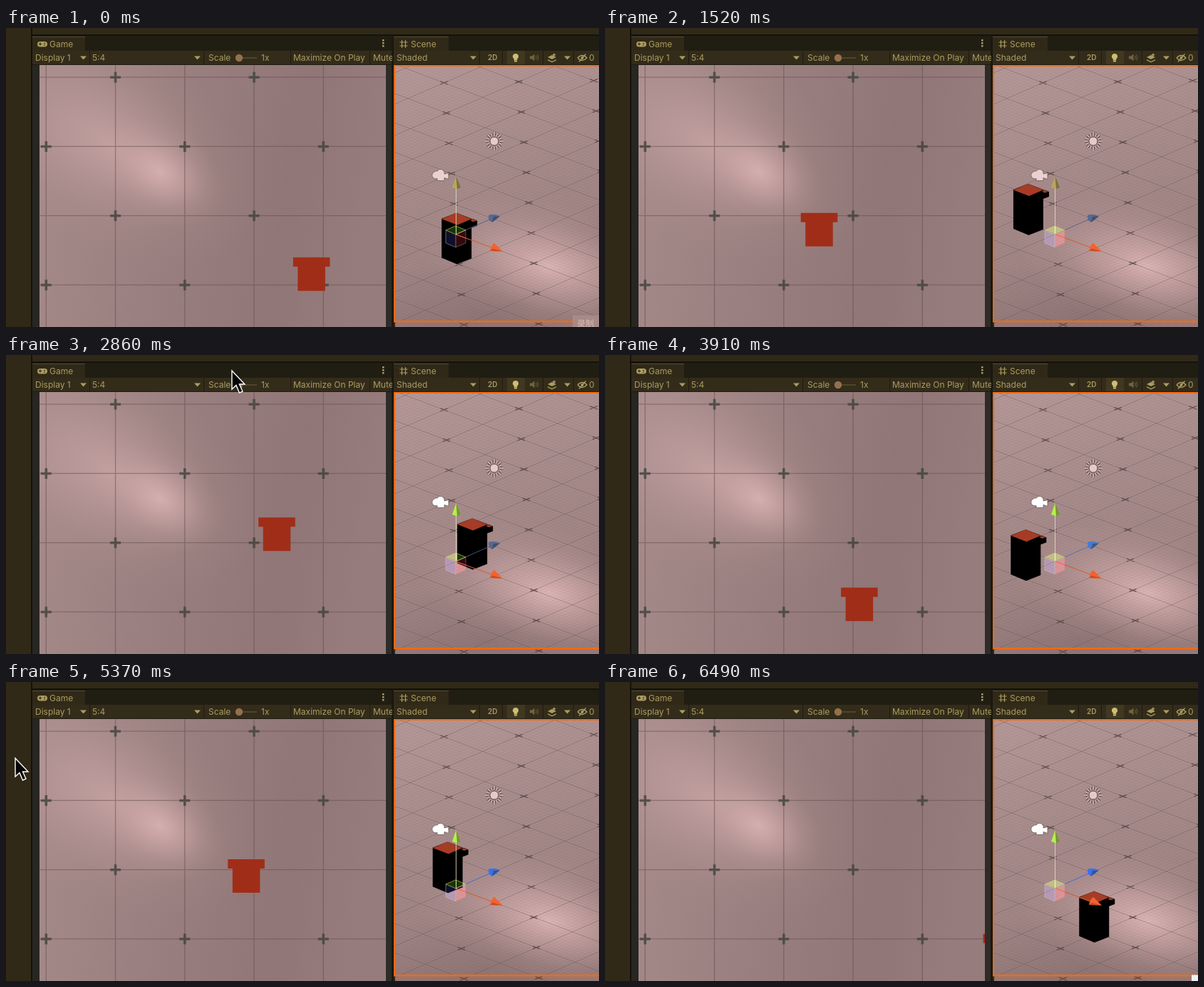
Write an HTML page that moves like this. It is 832x420 px and loops after 6.56 s.

```html
<!DOCTYPE html>
<html lang="en">
<head>
<meta charset="utf-8">
<title>Game and scene views</title>
<style>
  html, body { margin: 0; width: 832px; height: 420px; overflow: hidden; background: #312917; }
  svg { display: block; }
  text { font: 12px Inter, Roboto, sans-serif; fill: #aa9c62; }
  .cube { mix-blend-mode: plus-lighter; }
  .glyph { fill: #aa9c62; }
  .line { fill: none; stroke: #aa9c62; }
</style>
</head>
<body>
<svg width="832" height="420" viewBox="0 0 832 420">
  <defs>
    <clipPath id="gameClip"><path d="M47 52H533V420H47Z"/></clipPath>
    <clipPath id="sceneClip"><path d="M546 54H832V420H546Z"/></clipPath>
    <linearGradient id="gameBase" x2="1" y2=".12">
      <stop offset="0" stop-color="#a78b8b"/>
      <stop offset=".5" stop-color="#977d7d"/>
      <stop offset=".78" stop-color="#907676"/>
      <stop offset="1" stop-color="#967c7c"/>
    </linearGradient>
    <linearGradient id="sceneBase" x2=".25" y2="1">
      <stop offset="0" stop-color="#b59897"/>
      <stop offset=".45" stop-color="#a88c8c"/>
      <stop offset=".75" stop-color="#a18585"/>
      <stop offset="1" stop-color="#907676"/>
    </linearGradient>
    <radialGradient id="glow">
      <stop offset="0" stop-color="#e4bbbb" stop-opacity=".9"/>
      <stop offset=".35" stop-color="#dcb3b3" stop-opacity=".55"/>
      <stop offset=".7" stop-color="#cfa8a8" stop-opacity=".16"/>
      <stop offset="1" stop-color="#c8a0a0" stop-opacity="0"/>
    </radialGradient>
    <linearGradient id="gutter">
      <stop offset="0" stop-color="#272622"/>
      <stop offset="1" stop-color="#2e2c28"/>
    </linearGradient>
  </defs>

  <!-- window chrome -->
  <path fill="#312917" d="M0 0H832V420H0Z"/>
  <path fill="#201d13" d="M37 10H832V32H37Z"/>
  <path fill="#312917" d="M37 12H111V32H37ZM544 12H621V32H544Z"/>
  <path fill="#14120b" d="M35 0H37V420H35ZM37 9H832V11H37Z"/>
  <path fill="#504a3a" d="M37 12H111V13H37ZM544 12H621V13H544Z"/>
  <path fill="#332c1a" d="M37 32H832V52H37Z"/>
  <path fill="#1f1b10" d="M37 51H832V52H37ZM117 32h1V52h-1ZM277 32h1V52h-1ZM399 32h1V52h-1ZM510 32h1V52h-1ZM664 32h1V52h-1ZM696 32h1V52h-1ZM753 32h1V52h-1ZM796 32h1V52h-1Z"/>
  <path fill="url(#gutter)" d="M37 52H47V420H37ZM533 52H544V420H533Z"/>
  <path fill="#1a1810" d="M541 10H544V420H541Z"/>

  <text x="61" y="27">Game</text>
  <text x="568" y="27">Scene</text>
  <text x="41" y="46">Display 1</text>
  <text x="121" y="46">5:4</text>
  <text x="284" y="46">Scale</text>
  <text x="358" y="46">1x</text>
  <text x="403" y="46">Maximize On Play</text>
  <svg x="511" y="32" width="31" height="20"><text x="4" y="14">Mute</text></svg>
  <text x="548" y="46">Shaded</text>
  <text x="676" y="45" style="font-size:10px;font-weight:600">2D</text>
  <text x="818" y="46">0</text>

  <path class="glyph" d="M104 39.500h9l-4.500 5ZM264 39.500h9l-4.500 5ZM651 39.500h9l-4.500 5ZM783 39.500h9l-4.500 5ZM528 16h2.500v2.500H528ZM528 20h2.500v2.500H528ZM528 24h2.500v2.500H528Z"/>
  <path class="line" stroke-opacity=".45" d="M322 42H352"/>
  <circle cx="327" cy="42" r="5.200" fill="#94704c"/>
  <rect class="glyph" x="44" y="19" width="14" height="7.500" rx="3.700"/>
  <path stroke="#312917" stroke-width="1.200" d="M46 22.500h4M48 20.500v4M53 21.500h2M53 24h2"/>
  <path class="line" stroke-width="1.200" d="M555.500 17v11M560.500 17v11M552.500 20h11M552.500 25h11"/>
  <path fill="#40381f" d="M703 32H728V51H703Z"/>
  <path fill="#d0bd74" d="M715 36a4 4 0 0 1 2.300 7.300v2.200h-4.600v-2.200a4 4 0 0 1 2.300-7.300ZM713 46h4v1.500h-4Z"/>
  <g opacity=".5">
    <path class="glyph" d="M735 39.500h3l3.500-3v10l-3.500-3h-3Z"/>
    <path class="line" d="M743.500 39q1.500 2.500 0 5M745.500 37.500q3 4 0 8"/>
  </g>
  <path class="glyph" d="M760 41l6-3 6 3-6 3ZM760 44l6 3 6-3v1.500l-6 3-6-3ZM769 35l1 2 2 .5-2 1-1 2-1-2-2-1 2-.5Z"/>
  <path class="line" stroke-width="1.300" d="M802 42q6.500-7 13 0q-6.500 7-13 0M804 47.500l9.500-11"/>
  <circle class="glyph" cx="808.500" cy="42" r="2"/>

  <!-- game view -->
  <g clip-path="url(#gameClip)">
    <path fill="url(#gameBase)" d="M47 52H533V420H47Z"/>
    <ellipse rx="230" ry="140" transform="translate(148 165) rotate(30)" fill="url(#glow)" opacity=".55"/>
    <ellipse rx="100" ry="66" transform="translate(216 202) rotate(32)" fill="url(#glow)" opacity=".8"/>
    <path id="gameGrid" stroke="#67504f" stroke-opacity=".55" stroke-width="1.300"/>
    <path id="pluses" stroke="#3c4038" stroke-opacity=".72" stroke-width="3.600"/>
    <path id="player" fill="#a02d18" d="M0 0H51.500V13H45V47H6.500V13H0Z"/>
  </g>

  <!-- scene view -->
  <g clip-path="url(#sceneClip)">
    <path fill="url(#sceneBase)" d="M544 52H832V420H544Z"/>
    <ellipse rx="190" ry="92" transform="translate(762 335) rotate(14)" fill="url(#glow)"/>
    <path id="minor" stroke="#5c4a4a" stroke-opacity=".06"/>
    <path id="major" stroke="#5c5050" stroke-opacity=".38"/>
    <path id="marks" stroke="#4c403c" stroke-opacity=".65" stroke-width="1.500"/>
    <g id="figure">
      <path d="M0 8L21 0L42 8V64L21.500 72L0 63ZM35 11L44 8.500L50 11V18L42 21L36 19Z"/>
      <path fill="#a63c25" d="M0 8.500L21 0L42 8.500L22 17ZM40 10.500L44 9L49 11L44 12.500Z"/>
    </g>
    <path class="rays" stroke="#594847" stroke-width="3.200"/>
    <path class="rays" stroke="#e6cac8" stroke-width="1.500"/>
    <circle cx="685" cy="159" r="6" fill="#e6cac8" stroke="#594847"/>
    <path id="camera" stroke="#6a5856" stroke-width=".8" d="M601 202a4.500 4.500 0 0 1 4-1a5.500 5.500 0 0 1 10 1.500l0 2.500l6-1.500v9l-6-2v4h-10v-3a4.500 4.500 0 1 1-4-9.500Z"/>
    <g fill="none">
      <path stroke="#e4e2c4" stroke-opacity=".8" d="M631.500 225V290"/>
      <path stroke="#e0623c" d="M631 290L680 308"/>
      <path id="blueAxis" stroke-opacity=".8" d="M631 290L678 269"/>
    </g>
    <path class="cube" fill="#1c3400" d="M617 284L631 278L645 284L631 290Z"/>
    <path class="cube" fill="#10102c" d="M617 284L631 290V308L617 302Z"/>
    <path class="cube" fill="#300a0e" d="M645 284L631 290V308L645 302Z"/>
    <g fill="none" stroke-width=".8">
      <path stroke="#c9cdc9" stroke-opacity=".6" d="M617 284V302L631 308V290"/>
      <path stroke="#e08070" stroke-opacity=".6" d="M631 308L645 302V284"/>
      <path stroke="#c8d070" stroke-opacity=".8" d="M617 284L631 278L645 284L631 290Z"/>
    </g>
    <path id="upCone" d="M631.500 208L638 224Q632 227.500 626 224Z"/>
    <path fill="#474420" fill-opacity=".55" d="M631.500 208L638 224L633 226Z"/>
    <path id="blueCone" d="M677 263Q685 260 693 264.500L682 273L677.500 270Z"/>
    <path fill="#2b3446" fill-opacity=".5" d="M684 265L693 264.500L682 273Z"/>
    <path fill="#f4622e" d="M685 302L697 314L679 313Q680 306 685 302Z"/>
    <path fill="#a13a20" fill-opacity=".6" d="M697 314L679 313L683 310Z"/>
  </g>
  <path fill="#f26a10" d="M544 52H832V54H546V411H832V413.500H544Z"/>
  <g id="badge">
    <path fill="#a88d8a" fill-opacity=".88" d="M795 403.500H832V420H795Z"/>
    <text x="801" y="420" style="font:12px 'Noto Sans CJK SC','Noto Sans CJK',sans-serif;fill:#d4bdb8">录制</text>
  </g>
  <path id="corner" fill="#f2f0ee" d="M823 411.500H832V420H823Z"/>
  <path id="cursor" fill="#050505" stroke="#fff" stroke-width="1.400" d="M0 0V26L6 20.500L10.500 31L15 29L10.500 19H18Z"/>
</svg>
<script>
const LOOP = 6560;
const $ = id => document.getElementById(id);

// [ms, x, y] of the player's top left corner in the game view
const walk = [
  [0, 403, 322.5], [340, 362, 222], [690, 402, 325], [1050, 317, 240], [1380, 318, 275],
  [1520, 275, 260], [1800, 200, 218], [2090, 200, 165], [2440, 245, 178], [2790, 336, 218],
  [2860, 354, 228], [2940, 370, 238], [3130, 340, 252], [3480, 290, 262], [3760, 302, 370],
  [3910, 331, 327], [4190, 358, 256], [4400, 382, 258], [4590, 372, 330], [4740, 348, 286],
  [4880, 330, 258], [5100, 288, 226], [5370, 311, 249], [5580, 442, 274], [6030, 672, 482],
  [6280, 608, 425], [6490, 531, 354], [LOOP, 508, 335]
];
// the pointer only enters the stage now and then
const pointerRuns = [
  [[2300, 118, -30], [2620, 235, -22], [2860, 317, 22], [3140, 200, 2], [3480, 90, 33], [3550, 90, 33]],
  [[4260, 276, 108], [4740, 323, 288], [5250, 14, 110], [5370, 13, 107], [5440, 13, 108]]
];

// Cubic through timed points, tangents taken from the neighbours
function along(keys, t) {
  let i = 0;
  while (i < keys.length - 2 && t >= keys[i + 1][0]) i++;
  const a = keys[i], b = keys[i + 1], p = keys[i - 1] || a, n = keys[i + 2] || b;
  const span = b[0] - a[0], u = (t - a[0]) / span;
  return [1, 2].map(k => {
    const m0 = (b[k] - p[k]) / (b[0] - p[0]) * span;
    const m1 = (n[k] - a[k]) / (n[0] - a[0]) * span;
    const d = b[k] - a[k];
    return a[k] + u * (m0 + u * (3 * d - 2 * m0 - m1 + u * (m0 + m1 - 2 * d)));
  });
}

const toScene = (x, y) => [
  573 + 0.551 * (x - 275) - 0.519 * (y - 260),
  219 + 0.216 * (x - 275) + 0.211 * (y - 260)
];

function drawGrids() {
  let lines = "", pluses = "";
  for (let i = 0; i < 5; i++) {
    const x = 56.3 + i * 97.25;
    lines += `M${x} 52V420`;
    for (let j = 0; j < 4; j++) {
      const y = 69.2 + j * 97.25;
      if (!i) lines += `M47 ${y}H533`;
      if ((i + j) % 2) pluses += `M${x - 7.5} ${y}h15M${x} ${y - 7.5}v15`;
    }
  }
  $("gameGrid").setAttribute("d", lines);
  $("pluses").setAttribute("d", pluses);

  const u = [54.25, 20.5], v = [-50.75, 22];
  const at = (i, j) => [632 + i * u[0] + j * v[0], 289.5 + i * u[1] + j * v[1]];
  let minor = "", major = "", marks = "";
  for (let k = -90; k <= 90; k++) {
    const c = k / 10;
    const d = `M${at(c, -10)}L${at(c, 10)}M${at(-10, c)}L${at(10, c)}`;
    if (k % 10) minor += d; else major += d;
  }
  for (let i = -9; i <= 9; i++) for (let j = -9; j <= 9; j++) {
    if ((i + j) % 2 || (!i && !j)) continue;
    const [x, y] = at(i, j);
    marks += `M${x - 5} ${y - 2}l10 4M${x - 5} ${y + 2}l10-4`;
  }
  $("minor").setAttribute("d", minor);
  $("major").setAttribute("d", major);
  $("marks").setAttribute("d", marks);

  let rays = "";
  for (let k = 0; k < 16; k++) {
    const c = Math.cos(k * Math.PI / 8), s = Math.sin(k * Math.PI / 8), r = k % 2 ? 11 : 13;
    rays += `M${685 + 8 * c} ${159 + 8 * s}L${685 + r * c} ${159 + r * s}`;
  }
  for (const el of document.querySelectorAll(".rays")) el.setAttribute("d", rays);
}

const place = (el, [x, y]) => el.setAttribute("transform", `translate(${x.toFixed(2)} ${y.toFixed(2)})`);
const show = (el, on) => el.setAttribute("visibility", on ? "visible" : "hidden");
const paint = (id, name, value) => $(id).setAttribute(name, value);

function render(t) {
  const pos = along(walk, t);
  place($("player"), pos);
  place($("figure"), toScene(...pos));

  const run = pointerRuns.find(r => t >= r[0][0] && t < r[r.length - 1][0]);
  show($("cursor"), run);
  if (run) place($("cursor"), along(run, t));

  paint("camera", "fill", t < 2100 ? "#ead0ce" : "#fff");
  paint("upCone", "fill", t < 2100 ? "#b6a75c" : "#b4f04c");
  const blue = t < 3500 ? "#566a8e" : t < 5000 ? "#4a7ad0" : "#3c70ea";
  paint("blueCone", "fill", blue);
  paint("blueAxis", "stroke", blue);
  show($("badge"), t < 140);
  show($("corner"), t >= 6350);
}

drawGrids();
const start = performance.now();
function tick() {
  render((performance.now() - start) % LOOP);
  requestAnimationFrame(tick);
}
tick();
</script>
</body>
</html>
```
